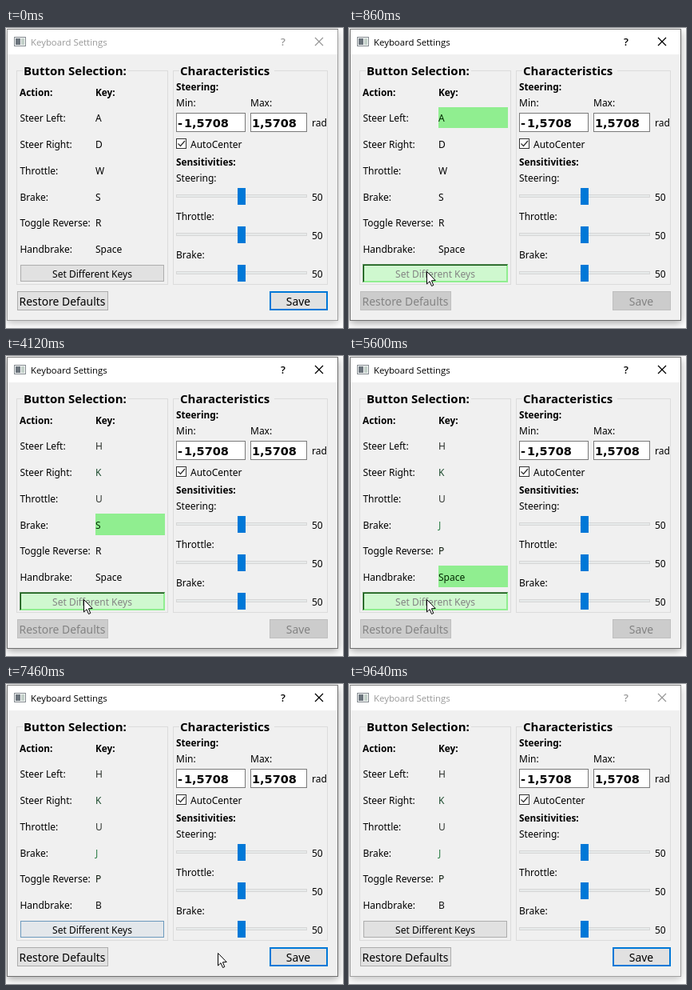
Recreate the animation shown at these times as an HTML page with a canvas. Size 422 by 375 pixels, loop 9.8 s.

```html
<!DOCTYPE html>
<html lang="en">
<head>
<meta charset="utf-8">
<title>Keyboard Settings</title>
<style>
html, body { margin: 0; width: 100%; height: 100%; overflow: hidden; background: #fff; }
canvas { display: block; }
</style>
</head>
<body>
<canvas id="stage" width="422" height="375"></canvas>
<script>
const ctx = document.getElementById('stage').getContext('2d');
const LOOP = 9800, ACTIVATE = 700, START = 860, DONE = 6460, LEAVE = 7150, BLUR = 9640;
const BLUE = '#0078d7', FACE = '#f0f0f0';
const BODY = '12px "Noto Sans", sans-serif';
const BOLD = 'bold 11.8px "Noto Sans", sans-serif';
const HEADING = 'bold 15px "Noto Sans", sans-serif';
const LARGE = '13.9px "Noto Sans", sans-serif';
const NUMBER = 'bold 14.5px "DejaVu Sans", sans-serif';
const TITLE = '11.4px "Open Sans", sans-serif';

// label, old key, new key, new key colour, time of the key press
const rows = [
  ['Steer Left:', 'A', 'H', '#2a2f2a', 2960],
  ['Steer Right:', 'D', 'K', '#1a4a2c', 3500],
  ['Throttle:', 'W', 'U', '#333833', 4120],
  ['Brake:', 'S', 'J', '#2a7d44', 4820],
  ['Toggle Reverse:', 'R', 'P', '#0c1a0c', 5600],
  ['Handbrake:', 'Space', 'B', '#111', DONE]
];

// Pointer moves: first step, last step, step count, from, to, easing powers
const moves = [
  [70, 623, 8, 430, 372, 97, 304, 2, 2],
  [5840, 5990, 3, 97, 304, 85, 304, 1, 1],
  [6150, 6150, 1, 85, 304, 84, 304, 1, 1],
  [LEAVE, 7780, 9, 84, 304, 309, 339, 2, 3],
  [8400, 8630, 4, 309, 339, 372, 384, 1, 1]
];

function fill(x, y, w, h, color) {
  ctx.fillStyle = color;
  ctx.fillRect(x, y, w, h);
}

function box(x, y, w, h, face, edge, line = 1) {
  fill(x, y, w, h, edge);
  fill(x + line, y + line, w - 2 * line, h - 2 * line, face);
}

function text(str, x, y, font = BODY, color = '#000', align = 'left') {
  ctx.font = font;
  ctx.fillStyle = color;
  ctx.textAlign = align;
  ctx.fillText(str, x, y);
}

function path(points, width, color) {
  ctx.beginPath();
  points.forEach(([x, y]) => ctx.lineTo(x, y));
  ctx.lineWidth = width;
  ctx.strokeStyle = color;
  ctx.stroke();
}

function mix(a, b, k) {
  return `rgb(${a.map((v, i) => Math.round(v + (b[i] - v) * k))})`;
}

function pointerAt(t) {
  let pos = null;
  for (const [start, end, count, x0, y0, x1, y1, px, py] of moves) {
    if (t < start) break;
    const gap = (end - start) / (count - 1) || 1;
    // steps fall on whole hundredths of a second, slightly before the even spacing
    const u = Math.min(count, 1 + Math.floor((t - start) / gap + 0.1)) / count;
    pos = [x0 + (x1 - x0) * (1 - (1 - u) ** px), y0 + (y1 - y0) * (1 - (1 - u) ** py)].map(Math.round);
  }
  return pos;
}

function drawWindow(active) {
  fill(0, 0, 422, 375, '#fff');
  ctx.save();
  ctx.shadowColor = active ? 'rgba(0,0,0,.35)' : 'rgba(0,0,0,.25)';
  ctx.shadowBlur = 10;
  ctx.shadowOffsetY = 3;
  fill(1, 1, 415, 365, active ? '#707070' : '#a0a0a0');
  ctx.restore();
  fill(1, 1, 415, 1, '#808080');
  fill(2, 2, 413, 31, '#fff');
  fill(2, 33, 413, 332, FACE);

  const ink = active ? '#000' : '#999';
  box(10, 11, 15, 12, '#f4f6f6', '#858b90');
  fill(12, 13, 6, 8, '#6b747c');
  fill(19, 13, 4, 8, '#c3d0c9');
  text('Keyboard Settings', 31, 22, TITLE, ink);
  text('?', 347, 22, '600 13px "Open Sans", sans-serif', ink, 'center');
  path([[387, 12], [397, 22]], 1.2, ink);
  path([[397, 12], [387, 22]], 1.2, ink);
}

function drawGroup(x, w, title, titleWidth) {
  box(x, 53, w, 268, FACE, '#dcdcdc');
  fill(x + 8, 50, titleWidth, 6, FACE);
  text(title, x + 9, 59, HEADING);
}

function drawKeys(t) {
  drawGroup(13, 190, 'Button Selection:', 132);
  text('Action:', 17, 85, BOLD);
  text('Key:', 112, 85, BOLD);
  let since = START;
  rows.forEach(([label, oldKey, newKey, color, time], i) => {
    const y = Math.round(117.3 + 32.75 * i);
    const waiting = t >= since && t < time;
    if (waiting) fill(112, Math.floor(99 + 32.75 * i), 87, i ? 27 : 26, '#90ee90');
    text(label, 17.4, y);
    if (t < time) text(oldKey, 112, y, BODY, waiting ? '#002800' : '#000');
    else text(newKey, 112, y, BODY, color);
    since = time;
  });
}

function drawSlider(label, y) {
  text(label, 213, y - 18);
  box(213, y - 2, 164, 4, '#e7eaea', '#d6d6d6');
  fill(290, y - 10, 10, 21, BLUE);
  text('50', 383, y + 6);
}

function drawCharacteristics() {
  drawGroup(209, 194, 'Characteristics', 119);
  text('Steering:', 213, 78, BOLD);
  text('Min:', 213, 98);
  text('Max:', 306, 98);
  box(213, 106, 87, 24, '#fff', '#7a7a7a');
  box(306, 106, 71, 24, '#fff', '#7a7a7a');
  text('-', 215, 124, NUMBER);
  text('1,5708', 223, 124, NUMBER);
  text('1,5708', 308, 124, NUMBER);
  text('rad', 383, 123);
  box(213, 138, 13, 13, '#fff', '#333');
  path([[215.5, 144.5], [218.5, 147.5], [224, 141]], 1.3, '#333');
  text('AutoCenter', 231, 150);
  text('Sensitivities:', 213, 172, BOLD);
  drawSlider('Steering:', 210);
  drawSlider('Throttle:', 258);
  drawSlider('Brake:', 306);
}

function drawButtons(t, pointer) {
  const disabled = t >= START && t < DONE;
  const ink = disabled ? '#838383' : '#000';
  const face = disabled ? '#ccc' : '#e1e1e1';
  const edge = disabled ? '#bfbfbf' : '#adadad';

  if (disabled) {
    box(17, 295, 182, 23, '#cff8cf', '#90ee90', 2);
    fill(17, 295, 182, 1, '#5c8f5c');
    fill(17, 295, 1, 23, '#5c8f5c');
    fill(18, 296, 180, 1, '#0a500a');
    fill(18, 296, 1, 21, '#0a500a');
  } else if (t >= ACTIVATE && t < START) {
    box(18, 296, 180, 21, '#cce4f7', '#005499');
  } else {
    let hover = 0;
    if (t < ACTIVATE) hover = pointer && pointer[0] < 198 && pointer[1] < 317 ? 1 : 0;
    else hover = Math.max(0, Math.min(1, 1 - (t - LEAVE) / 500));
    box(18, 296, 180, 21,
      mix([225, 225, 225], [229, 241, 251], hover),
      mix([173, 173, 173], [0, 120, 215], hover));
  }
  text('Set Different Keys', 108, 312, BODY, ink, 'center');

  box(14, 329, 114, 24, face, edge);
  text('Restore Defaults', 70.5, 347, LARGE, ink, 'center');
  box(330, 329, 73, 24, face, disabled ? edge : BLUE, disabled ? 1 : 2);
  text('Save', 366, 347, LARGE, ink, 'center');
}

function drawPointer([x, y]) {
  ctx.save();
  ctx.translate(x + 0.5, y + 0.5);
  ctx.beginPath();
  [[0, 0], [0, 15.5], [3.5, 12.2], [6, 18], [8.3, 17], [5.9, 11.3], [10.7, 11]]
    .forEach(([px, py]) => ctx.lineTo(px, py));
  ctx.closePath();
  ctx.fillStyle = '#fff';
  ctx.fill();
  ctx.lineWidth = 1;
  ctx.strokeStyle = '#000';
  ctx.stroke();
  ctx.restore();
}

function draw(now) {
  const t = now % LOOP;
  const pointer = pointerAt(t);
  drawWindow(t >= ACTIVATE && t < BLUR);
  drawKeys(t);
  drawCharacteristics();
  drawButtons(t, pointer);
  if (pointer) drawPointer(pointer);
  requestAnimationFrame(draw);
}
requestAnimationFrame(draw);
</script>
</body>
</html>
```
